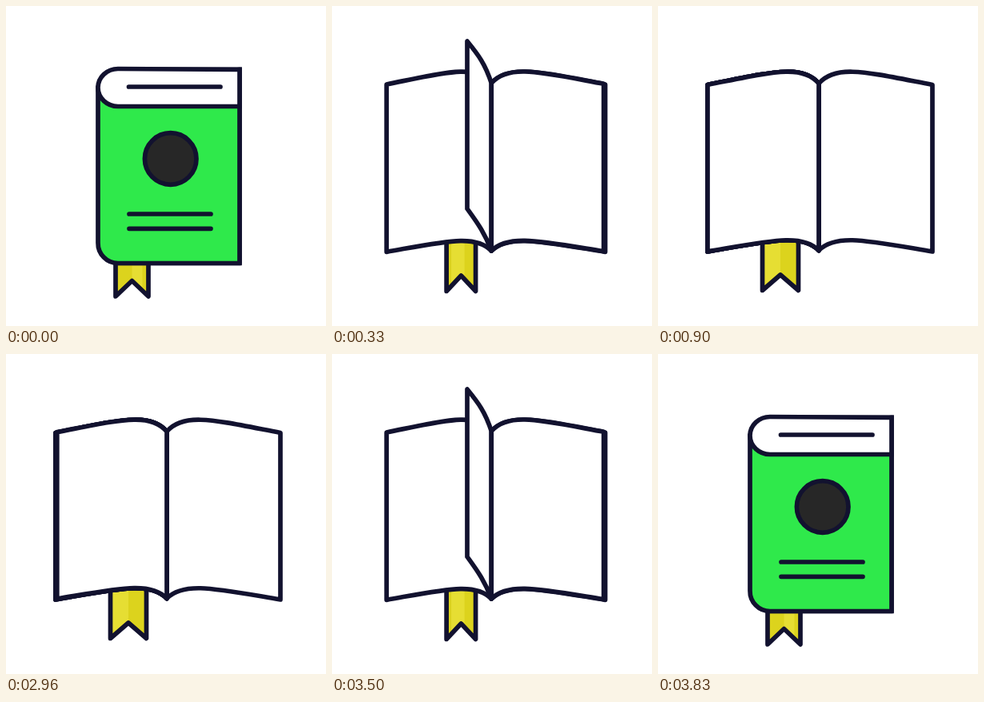
An HTML page for the animation above (4860 ms loop, 400x400 px).

```html
<!DOCTYPE html>
<html lang="en">
<head>
<meta charset="utf-8">
<title>Book</title>
<style>
html, body { margin: 0; width: 100%; height: 100%; overflow: hidden; background: #fff; }
svg { display: block; width: 100vw; height: 100vh; }
.ink { stroke: #12122f; stroke-width: 5.7; stroke-linejoin: round; stroke-linecap: round; }
.ink * { vector-effect: non-scaling-stroke; }
.cover path { stroke-linejoin: miter; }
</style>
</head>
<body>
<svg viewBox="0 0 400 400">
  <path id="cloth" fill="#dcd31d"/>
  <path id="shine" fill="#e6de33"/>
  <path id="edge" class="ink" fill="none"/>
  <g id="sheets" class="ink" fill="#fff"></g>
  <g id="cover" class="ink cover">
    <path fill="#2fe94b" d="M115 102V296A25 25 0 0 0 140 321.5H292V79.5Z"/>
    <path fill="#fff" d="M292 79.5L140 78.5A25 23.5 0 0 0 140 125.5H292Z"/>
    <path fill="none" d="M153.5 101H268M154 260H256M154 278.3H256"/>
    <circle cx="205.7" cy="191" r="32.3" fill="#272727"/>
  </g>
</svg>
<script>
const LOOP = 4860, STEP = 30, OPEN = 900, CLOSE_AT = 2930;
const COVER_SPAN = 370, PAGE_SPAN = 365, RIBBON_SPAN = 540;
const PAGE_STARTS = [134, 312, 525];
const LEFT_W = -139, TOP_W = -16, LIFT = 61;

const $ = id => document.getElementById(id);
const clamp = x => Math.max(0, Math.min(1, x));
const ease = x => 0.5 - 0.5 * Math.cos(Math.PI * clamp(x));
const mix = (a, b, k) => a + (b - a) * k;

// One long edge of a leaf, from the spine (x, y) to its outer corner.
function edge(x, y, w, lift, arch) {
  const curl = 0.06 * lift;
  return [
    [x, y],
    [x + 0.15 * w - curl, y - 25 * arch],
    [x + 0.43 * w - curl, y - 14 * arch - 0.4 * lift],
    [x + w, y + 1.5 * arch - lift]
  ];
}

function leaf({ x, top, bottom, arch }, w, lift = 0) {
  const [a, b, c, d] = edge(x, top, w, lift, arch);
  const [e, f, g, h] = edge(x, bottom, w, lift, arch * 0.87);
  return `M${a}C${b} ${c} ${d}L${h}C${g} ${f} ${e}Z`;
}

const sheets = Array.from({ length: PAGE_STARTS.length + 2 }, () =>
  $('sheets').appendChild(document.createElementNS('http://www.w3.org/2000/svg', 'path')));

function drawRibbon(u) {
  const k = ease(u / RIBBON_SPAN), sway = Math.sin(Math.PI * k);
  const mid = mix(157.5, 153, k) + 8 * sway;
  const half = mix(20.5, 22.5, k) - 4.2 * sway;
  const tip = mix(363, 355.5, k) - 1.7 * sway, notch = tip - 19.5, top = 285;
  const shape = `M${mid - half} ${top}V${tip}L${mid} ${notch}L${mid + half} ${tip}V${top}Z`;
  const s0 = mid - half * k, s1 = mid + 13 * (1 - k);
  const foot = x => notch + (tip - notch) * Math.abs(x - mid) / half;
  $('cloth').setAttribute('d', shape);
  $('edge').setAttribute('d', shape);
  $('shine').setAttribute('d',
    `M${s0} ${top}V${foot(s0)}L${mid} ${notch}L${s1} ${foot(s1)}V${top}Z`);
}

function drawCover(e) {
  const a = 1 - 2 * e, d = mix(1, 209 / 242, e);
  const x = mix(115, 201, e) - 115 * a, y = mix(79.5, 97, e) - 79.5 * d;
  $('cover').style.display = a > 0 ? '' : 'none';
  $('cover').setAttribute('transform', `matrix(${a} 0 0 ${d} ${x} ${y})`);
}

function draw(u) {
  const e = ease(u / COVER_SPAN);
  const book = { x: mix(140, 201, e), top: mix(79.3, 97, e), bottom: mix(321.5, 305.6, e), arch: e };
  const right = mix(152, 142, e);
  const fallen = [], rising = [];

  if (e > 0.5) fallen.push(leaf(book, LEFT_W * (2 * e - 1)));
  for (const start of PAGE_STARTS) {
    const p = ease((u - start) / PAGE_SPAN);
    if (p <= 0) continue;
    const w = p < 0.5 ? mix(right, TOP_W, 2 * p) : mix(TOP_W, LEFT_W, 2 * p - 1);
    const page = leaf(book, w, LIFT * (1 - Math.abs(2 * p - 1)));
    if (p < 0.5) rising.unshift(page); else fallen.push(page);
  }
  const all = [leaf(book, right), ...fallen, ...rising];
  sheets.forEach((s, i) => s.setAttribute('d', all[i] ?? ''));
  drawRibbon(u);
  drawCover(e);
}

// Opens, rests, then plays the same motion backwards.
function show(t) {
  const snap = x => Math.floor(x / STEP + 1e-6) * STEP;
  draw(t < CLOSE_AT ? Math.min(OPEN, snap(t)) : Math.max(0, OPEN - snap(t - CLOSE_AT)));
}

let begin;
function loop(now) {
  begin ??= now;
  show(Math.max(0, now - begin) % LOOP);
  requestAnimationFrame(loop);
}
show(0);
requestAnimationFrame(loop);
</script>
</body>
</html>
```
